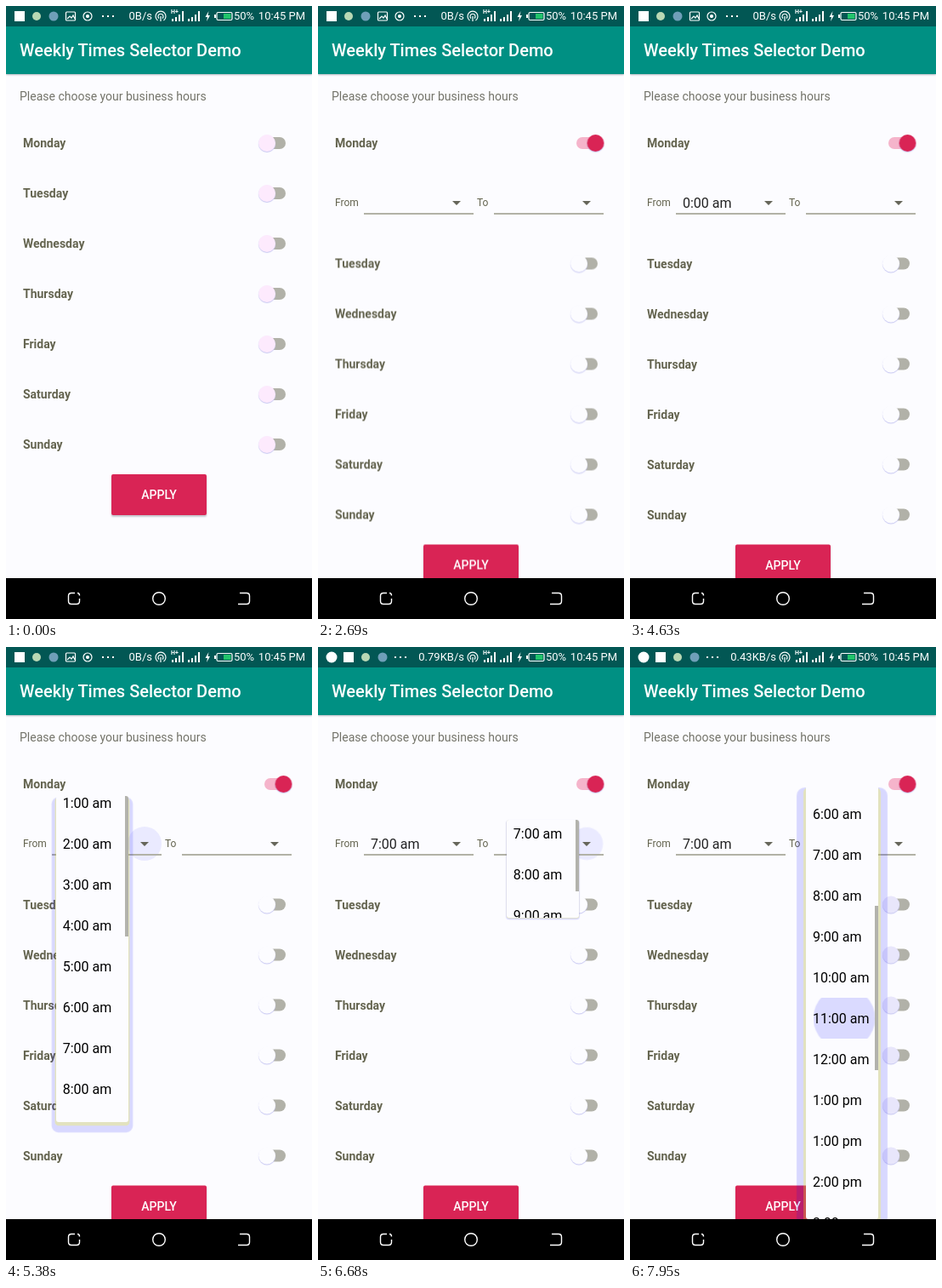
Write an HTML page that moves like this. It is 360x720 px and loops after 8000 ms.

```html
<!DOCTYPE html>
<html lang="en">
<head>
<meta charset="utf-8">
<title>Opening hours form</title>
<style>
@property --s { syntax: "<number>"; inherits: true; initial-value: 0; }
@property --y { syntax: "<length>"; inherits: true; initial-value: 0px; }

html, body { margin: 0; width: 100%; height: 100%; overflow: hidden; background: #fcfcff; }
body { position: relative; font-family: Roboto, Inter, sans-serif; color: #64644f; }
body * { position: absolute; box-sizing: border-box; white-space: nowrap; }
svg { left: 0; top: 0; }

/* bars */
.status { left: 0; top: 0; width: 360px; height: 24px; background: #025754; color: #fff; font-size: 13px; line-height: 24px; }
.speed { right: 188px; }
.speed::after { position: static; content: "0B/s"; animation: speed 8s step-end infinite; }
.icons { animation: before 8s step-end infinite; }
.icons.more { animation-name: after; }
.bar { left: 0; top: 24px; width: 360px; height: 56px; padding-left: 16px; background: #009083; color: #fff;
  font: 500 20px/57px Roboto, Inter, sans-serif; box-shadow: 0 1px 2px #b9b9c2; }
.nav { left: 0; top: 672px; width: 360px; height: 48px; background: #000; }

/* form */
.screen { left: 0; top: 0; width: 360px; height: 672px; overflow: hidden; }
.hint { left: 16px; top: 96px; font-size: 14px; line-height: 20px; color: #74746a; }
.rest { left: 0; top: 0; animation: push 8s infinite; }
.day { left: 0; width: 360px; height: 40px; }
.day b { left: 20px; font-size: 14px; line-height: 40px; }
.track { left: 304px; top: 13px; width: 25px; height: 14px; border-radius: 7px; background: #b1b1a8; }
.thumb { left: 297px; top: 10px; width: 20px; height: 20px; border-radius: 50%;
  box-shadow: 0 1px 1px #c8c8f2; animation: tint 8s step-end infinite; }
.halo { left: 287px; top: 0; width: 40px; height: 40px; border-radius: 50%; background: #dcdcd6; opacity: 0; animation: halo 8s infinite; }
.first .track { animation: trackOn 8s infinite; }
.first .thumb { animation: thumbOn 8s infinite; }
.apply { left: 124px; top: 550px; width: 112px; height: 48px; border-radius: 2px; background: #d92455; color: #fff;
  font: 500 14px/49px Roboto, Inter, sans-serif; text-align: center; box-shadow: 0 2px 2px #c4c4cc; }

/* hour fields */
.fields { left: 0; top: 211px; width: 360px; height: 40px; line-height: 41px; font-size: 12px; animation: fields 8s infinite; }
.line { top: 32px; width: 129px; height: 2px; background: #b2b2a6; }
.arrow { top: 18px; border: 5px solid transparent; border-top-color: #66665a; border-bottom: 0; }
.wave { top: 0; width: 40px; height: 40px; border-radius: 50%; background: #eaeaff; opacity: 0; }
.from { left: 62px; font-size: 16px; color: #222; }
.from::after { position: static; content: ""; animation: value 8s step-end infinite; }

/* drop-down lists */
.pop { left: 0; top: 0; opacity: 0; --q: calc((1 - var(--s)) * (1 - var(--s))); animation: 8s linear infinite; }
.card { left: calc(var(--x) + 18px * var(--q)); top: calc(162px + 50px * var(--q));
  width: 85px; height: calc(510px - 480px * var(--q)); overflow: hidden; border-radius: 3px; background: #fcfcff;
  box-shadow: 0 calc(6px * var(--s)) 0 calc(3px * var(--s)) rgba(255, 255, 0, .25),
    0 calc(14px * var(--s)) 1px calc(11px * var(--s)) rgba(0, 0, 255, .14); }
.list { left: 0; top: calc(-243px * var(--q) - var(--y)); width: 85px; }
.item { left: 8px; font-size: 16px; line-height: 50px; color: #000; }
.thumbbar { right: 0; width: 4px; height: 193px; top: calc(var(--y) * .3795 - 243px * var(--q)); background: #b2b2ac; }
.press { left: 0; width: 85px; height: 48px; overflow: hidden; }
.press i { left: -11px; top: -32px; width: 112px; height: 112px; border-radius: 50%; background: #dadaff; transform: scale(0); animation: 8s linear infinite; }

#pop1 { --x: 54px; animation-name: pop1; }
#pop2 { --x: 54px; --y: 96px; animation-name: pop2; }
#pop3 { --x: 207px; --y: 240px; animation-name: pop3, scroll; }
#pop1 i { animation-name: press1; }
#pop2 i { animation-name: press2; }
#pop3 i { animation-name: press3; }

@keyframes speed {
  0% { content: "0B/s"; } 75.875% { content: "65B/s"; } 82.5% { content: "0.79KB/s"; } 93.75%, 100% { content: "0.43KB/s"; }
}
@keyframes value { 0% { content: ""; } 56% { content: "0:00 am"; } 78.75%, 100% { content: "7:00 am"; } }
@keyframes before { 0% { visibility: visible; } 82.5%, 100% { visibility: hidden; } }
@keyframes after { 0% { visibility: hidden; } 82.5%, 100% { visibility: visible; } }
@keyframes tint { 0% { background: #fdeafd; } 8.625% { background: #fcfcff; } 85.625%, 100% { background: #e8e6fb; } }
@keyframes push { 0%, 22% { transform: none; animation-timing-function: ease-in-out; } 25.75%, 100% { transform: translateY(82.5px); } }
@keyframes fields { 0%, 25.75% { opacity: 0; } 28.5%, 100% { opacity: 1; } }
@keyframes trackOn { 0%, 22% { background: #b1b1a8; } 24.5%, 100% { background: #f5b4cb; } }
@keyframes thumbOn {
  0%, 8.62% { background: #fdeafd; transform: none; }
  8.625%, 22% { background: #fcfcff; transform: none; animation-timing-function: ease-in-out; }
  24.5%, 100% { background: #d92455; transform: translateX(19.5px); }
}
@keyframes halo {
  0%, 21% { opacity: 0; transform: scale(.4); }
  22% { opacity: 1; transform: scale(.8); background: #dcdcd6; }
  24.5% { opacity: .8; transform: translateX(19.5px); background: #f6c9d4; }
  28.5%, 100% { opacity: 0; transform: translateX(19.5px); background: #f6c9d4; }
}
@keyframes waveFrom {
  0%, 39.37% { opacity: 0; transform: scale(.3); }
  39.375% { opacity: 1; transform: scale(.3); }
  42%, 46% { opacity: 1; transform: none; }
  47.375% { opacity: 0; transform: none; }
  63.99% { opacity: 0; transform: scale(.3); }
  64% { opacity: 1; transform: scale(.3); }
  66.6%, 70.6% { opacity: 1; transform: none; }
  72%, 100% { opacity: 0; transform: none; }
}
@keyframes waveTo {
  0%, 81.62% { opacity: 0; transform: scale(.3); }
  81.625% { opacity: 1; transform: scale(.3); }
  84.25%, 88.25% { opacity: 1; transform: none; }
  89.625%, 100% { opacity: 0; transform: none; }
}
@keyframes pop1 {
  0%, 40.93% { --s: 0; opacity: 0; } 40.9375% { --s: 0; opacity: 1; }
  44.4375%, 56% { --s: 1; opacity: 1; } 57.875%, 100% { --s: 1; opacity: 0; }
}
@keyframes pop2 {
  0%, 65.56% { --s: 0; opacity: 0; } 65.5625% { --s: 0; opacity: 1; }
  69.0625%, 78.75% { --s: 1; opacity: 1; } 80.625%, 100% { --s: 1; opacity: 0; }
}
@keyframes pop3 {
  0%, 83.18% { --s: 0; opacity: 0; } 83.1875% { --s: 0; opacity: 1; }
  86.6875%, 100% { --s: 1; opacity: 1; }
}
@keyframes scroll { 0%, 91.5% { --y: 240px; animation-timing-function: ease-out; } 96.25%, 100% { --y: 374px; } }
@keyframes press1 { 0%, 53.5% { transform: scale(0); } 55.5%, 100% { transform: none; } }
@keyframes press2 { 0%, 77.125% { transform: scale(0); } 78.75%, 100% { transform: none; } }
@keyframes press3 { 0%, 98.25% { transform: scale(0); } 100% { transform: none; } }
</style>
</head>
<body>
<div class="screen">
  <div class="hint">Please choose your business hours</div>
  <div class="first" id="first"></div>
  <div class="fields">
    <div class="wave" style="left:143px; animation:waveFrom 8s infinite"></div>
    <div class="wave" style="left:296px; animation:waveTo 8s infinite"></div>
    <span style="left:20px">From</span><span style="left:187px">To</span>
    <div class="line" style="left:54px"></div><div class="line" style="left:207px"></div>
    <div class="arrow" style="left:158px"></div><div class="arrow" style="left:311px"></div>
    <span class="from"></span>
  </div>
  <div class="rest" id="rest"><div class="apply">APPLY</div></div>
  <div class="pop" id="pop1"></div>
  <div class="pop" id="pop2"></div>
  <div class="pop" id="pop3"></div>
</div>

<div class="bar">Weekly Times Selector Demo</div>

<div class="status">
  <svg class="icons" width="130" height="24" fill="none" stroke="#fff" stroke-width="1.2">
    <rect x="10" y="6" width="12" height="12" fill="#fff" stroke="none"/>
    <circle cx="36" cy="12" r="5" fill="#b9d8b4" stroke="none"/>
    <circle cx="56" cy="12" r="5.5" fill="#6f9fb8" stroke="none"/>
    <rect x="70.500" y="7" width="11" height="10" rx="1"/><path d="M72 15l3-3 2 2 2-3 2 4"/>
    <circle cx="96" cy="12" r="5"/><circle cx="96" cy="12" r="1.5" fill="#fff"/>
    <path d="M113 12h2m4 0h2m4 0h2" stroke-width="2"/>
  </svg>
  <svg class="icons more" width="130" height="24">
    <circle cx="16" cy="12" r="6.500" fill="#fff"/>
    <rect x="30" y="6" width="12" height="12" fill="#fff"/>
    <circle cx="56" cy="12" r="5" fill="#b9d8b4"/>
    <circle cx="76" cy="12" r="5.5" fill="#6f9fb8"/>
    <path d="M90 12h2m4 0h2m4 0h2" stroke="#fff" stroke-width="2"/>
  </svg>
  <span class="speed"></span>
  <svg width="360" height="24" fill="none" stroke="#fff" stroke-width="1.2">
    <path d="M178.500 17a6 6 0 1 1 7 0M180 14.500a3 3 0 1 1 4 0M182 12v6"/>
    <path d="M196 18v-3m4 3v-5m4 5v-8m4 8V6M215 18v-3m4 3v-5m4 5v-8m4 8V6" stroke-width="2"/>
    <path d="M238.500 6l-4 7h2.500l-1 5 4-7h-2.500z" fill="#fff" stroke="none"/>
    <rect x="248" y="7.500" width="18" height="9" rx="1.500"/><path d="M246 10v4" stroke-width="2"/>
    <rect x="256" y="9" width="8.500" height="6" fill="#21c46b" stroke="none"/>
  </svg>
  <span style="left:194px; top:-5px; font-size:7px; font-weight:700">H+</span>
  <span style="left:268px">50%</span><span style="right:8px">10:45 PM</span>
</div>

<div class="nav">
  <svg width="360" height="48" fill="none" stroke="#fff" stroke-width="1.4">
    <path d="M81 17.500h-4q-3.500 0-3.500 3.500v6q0 3.500 3.500 3.500h6q3.500 0 3.500-3.500v-3M84 17.500q2.500 0 2.500 3"/>
    <circle cx="180" cy="24" r="7.300"/>
    <path d="M275 17.500h8q3.500 0 3.500 3.500v6q0 3.500-3.500 3.500h-10"/>
  </svg>
</div>

<script>
const days = ["Monday", "Tuesday", "Wednesday", "Thursday", "Friday", "Saturday", "Sunday"];
const byId = id => document.getElementById(id);
const hours = (from, to, half) =>
  Array.from({ length: to - from + 1 }, (_, i) => `${from + i}:00 ${half}`);
const options = ["", "24h", ...hours(0, 12, "am"), "1:00 pm", ...hours(1, 12, "pm")];

days.forEach((name, i) => {
  const halo = i ? "" : '<div class="halo"></div>';
  byId(i ? "rest" : "first").insertAdjacentHTML("beforeend",
    `<div class="day" style="top:${141 + 59 * i}px"><b>${name}</b>${halo}
     <div class="track"></div><div class="thumb"></div></div>`);
});

function fillList(id, picked) {
  const row = options.indexOf(picked) * 48;
  const items = options.map((text, i) => `<span class="item" style="top:${i * 48}px">${text}</span>`);
  byId(id).innerHTML = `<div class="card"><div class="list">
    <div class="press" style="top:${row}px"><i></i></div>${items.join("")}</div>
    <div class="thumbbar"></div></div>`;
}
fillList("pop1", "0:00 am");
fillList("pop2", "7:00 am");
fillList("pop3", "11:00 am");
</script>
</body>
</html>
```
